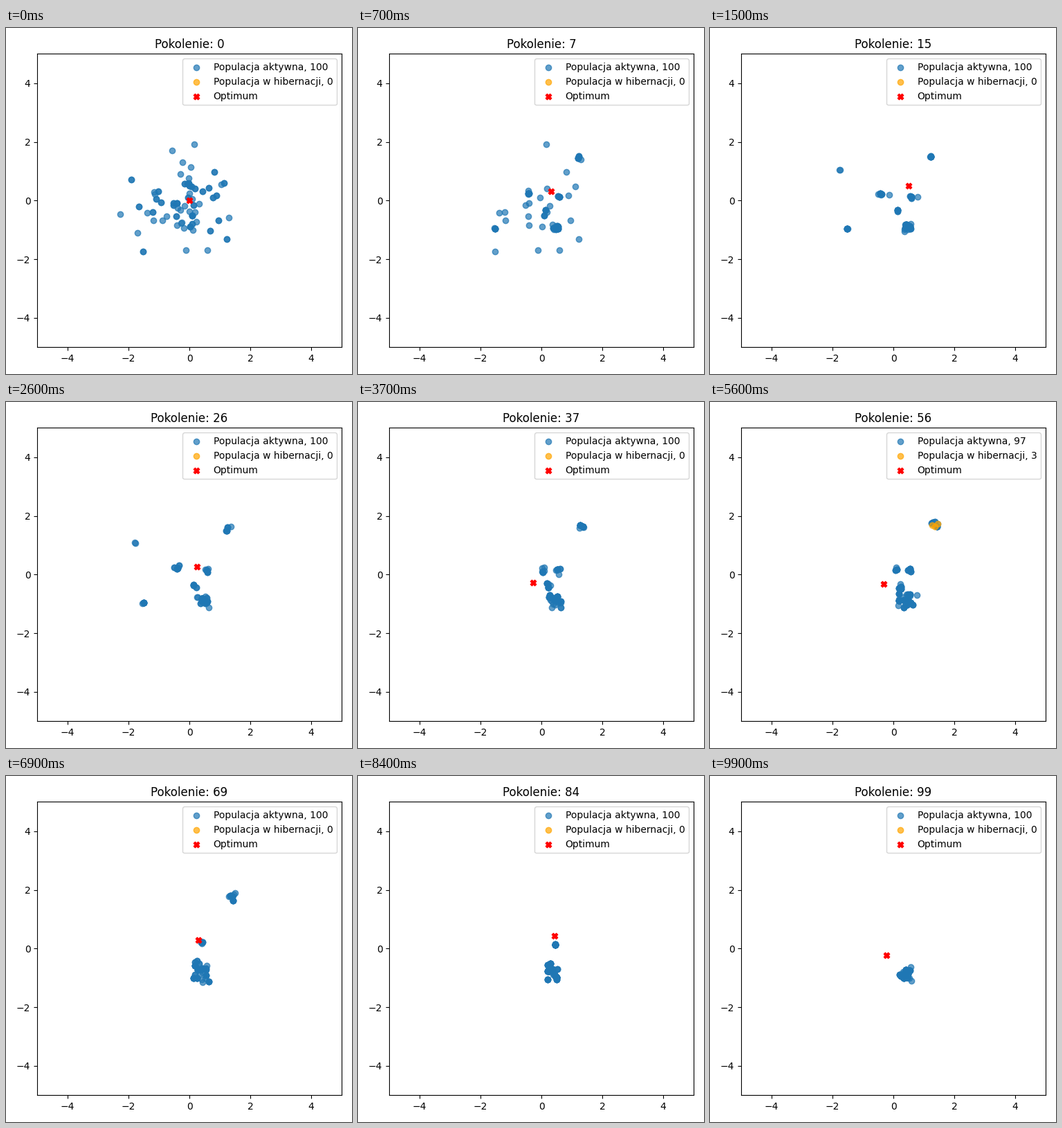
Write a matplotlib script that moves like this. It is 500 by 500 pixels and loops after 10 s.

```python
from collections import namedtuple

import numpy as np
import matplotlib.pyplot as plt
from matplotlib.animation import FuncAnimation

SIZE = 100
GENERATIONS = 100
EPOCH = 12              # generations a favoured spot lasts
SLEEP = range(42, 62)   # generations with hibernating individuals

# A niche drifts from start to end while it lives, with a few crowded spots.
Niche = namedtuple("Niche", "start end born died spread spots")
NICHES = [
    Niche((-1.77, 1.04), (-1.77, 1.04), 0, 34, 0.05, 1),
    Niche((-1.52, -0.96), (-1.52, -0.96), 0, 34, 0.05, 1),
    Niche((-0.42, 0.24), (-0.42, 0.24), 0, 36, 0.1, 2),
    Niche((1.2, 1.45), (1.45, 1.75), 0, 79, 0.12, 3),
    Niche((0.6, 0.12), (0.4, 0.17), 0, 92, 0.12, 2),
    Niche((0.12, -0.28), (0.28, -0.54), 0, 92, 0.1, 2),
    Niche((0.1, 0.1), (0.03, 0.25), 30, 62, 0.12, 2),
    Niche((0.48, -0.94), (0.36, -0.88), 0, 100, 0.28, 9),
]
RIDGE = 3               # the niche whose members hibernate

rng = np.random.default_rng(7)
founders = rng.normal(0, (0.9, 0.85), (64, 2))
initial = np.vstack([founders, rng.choice(founders, SIZE - len(founders))])
settle = 11 * rng.random(SIZE) ** 2
rank = rng.random(SIZE)
phase = rng.integers(0, EPOCH, SIZE)
offsets = rng.uniform(-1, 1, (len(NICHES), GENERATIONS // EPOCH + 2, 10, 2))


def slots(g):
    return [(j, s) for j, n in enumerate(NICHES) if n.born <= g < n.died
            for s in range(n.spots)]


def spot(j, s, epoch):
    n, t = NICHES[j], epoch * EPOCH
    life = np.clip((t - n.born) / (n.died - n.born), 0, 1)
    centre = (1 - life) * np.array(n.start) + life * np.array(n.end)
    return centre + n.spread * np.sin(np.pi * t / 125) * offsets[j, epoch, s]


def population(g):
    """Positions and niche numbers of all individuals in generation g."""
    if g == 0:
        return initial, np.full(SIZE, -1)
    free = slots(g)
    chosen = [free[int(r * len(free))] for r in rank]
    pos = np.array([spot(j, s, (g + p) // EPOCH)
                    for (j, s), p in zip(chosen, phase)])
    pos = np.where((g < settle)[:, None], initial, pos)
    noise = np.random.default_rng(g)
    mutant = noise.random((SIZE, 1)) < 0.05
    pos = pos + mutant * noise.normal(0, 0.1, (SIZE, 2))
    return pos, np.array([j for j, _ in chosen])


bedtime, home = population(SLEEP.start)
sleepers = np.flatnonzero(home == RIDGE)[:3]

fig, ax = plt.subplots(figsize=(5, 5), dpi=100)
ax.set(xlim=(-5, 5), ylim=(-5, 5))
active = ax.scatter([], [], color="tab:blue", alpha=0.7, label="Populacja aktywna, 100")
asleep = ax.scatter([], [], color="orange", alpha=0.7, label="Populacja w hibernacji, 0")
optimum = ax.scatter([], [], color="red", marker="X", label="Optimum")
labels = ax.legend(loc="upper right").get_texts()
title = ax.set_title("Pokolenie: 0")
fig.tight_layout()


def update(g):
    awake, _ = population(g)
    resting = np.empty((0, 2))
    if g in SLEEP:
        awake = np.delete(awake, sleepers, axis=0)
        resting = bedtime[sleepers]
    active.set_offsets(awake)
    asleep.set_offsets(resting)
    optimum.set_offsets([[0.5 * np.sin(0.1 * g)] * 2])
    labels[0].set_text(f"Populacja aktywna, {len(awake)}")
    labels[1].set_text(f"Populacja w hibernacji, {len(resting)}")
    title.set_text(f"Pokolenie: {g}")
    return active, asleep, optimum, title


# Import limits aside, every frame depends on its generation number only.
anim = FuncAnimation(fig, update, frames=GENERATIONS, interval=100,
                     repeat=True, repeat_delay=0)
plt.show()
```
